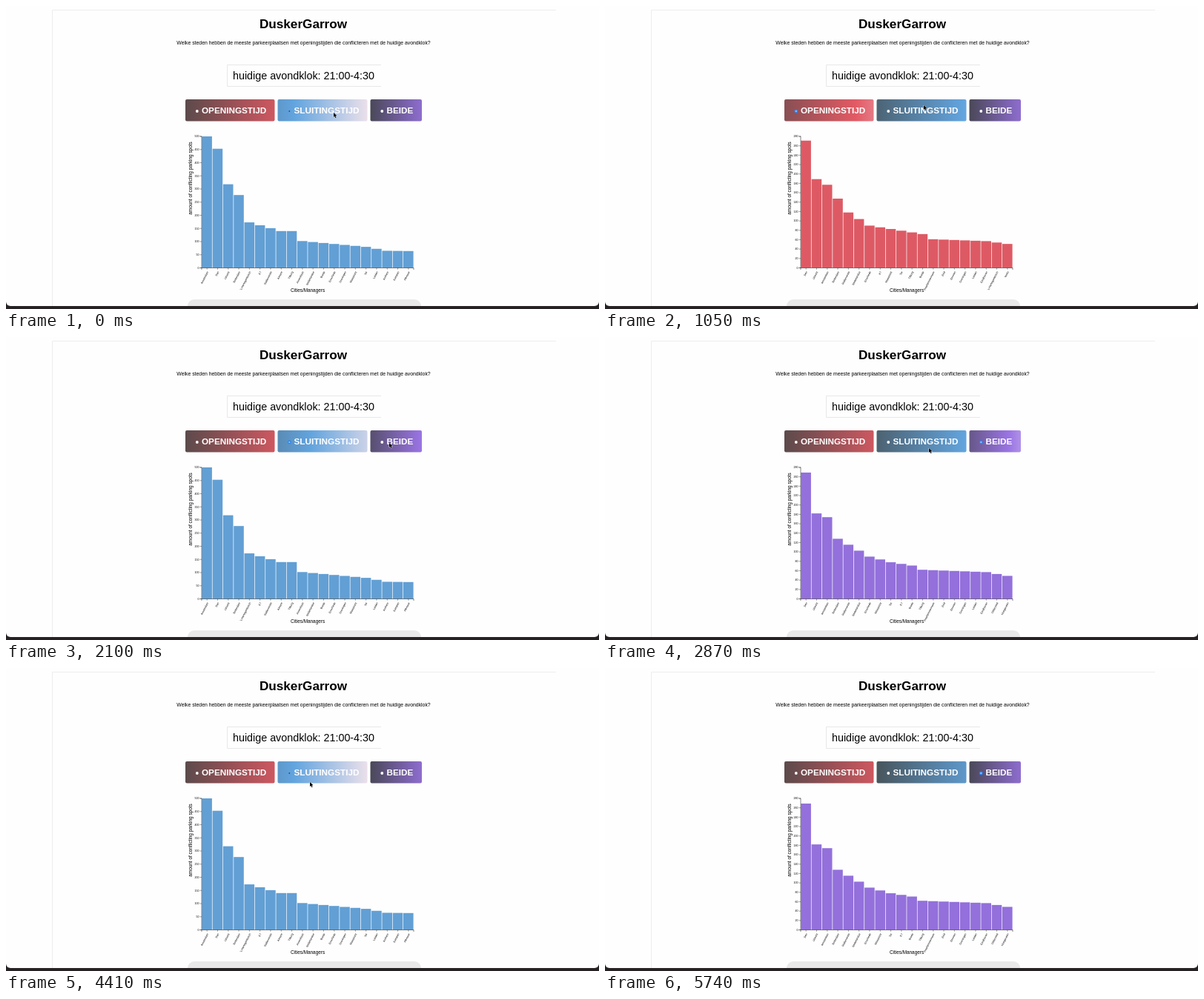
An HTML page with a canvas for the animation above (5810 ms loop, 800 by 409 pixels).

```html
<!DOCTYPE html>
<html lang="nl">
<head>
<meta charset="utf-8">
<title>Avondklok</title>
<style>
html, body { margin: 0; width: 100%; height: 100%; overflow: hidden; background: #fefefe; }
canvas { display: block; width: 800px; height: 409px; }
</style>
</head>
<body>
<canvas id="stage" width="800" height="409"></canvas>
<script>
const ctx = document.getElementById('stage').getContext('2d');
const LOOP = 5810, STEP = 70, FADE = 500;
const FONT = '"Liberation Sans", Arial, sans-serif';

const BARS = 20;
const PLOT = { left: 264, right: 550, top: 176, base: 353.5 };
const ROW = { top: 126, height: 29.5 };

// curve: a few [bar index, value] points, straight in between
const choices = [
  {
    label: 'OPENINGSTIJD', x: 242, w: 120.5, shades: ['#5c4a4b', '#e25a64', '#ecdde8'],
    color: '#dd5a64', max: 280, tick: 20,
    curve: [[0, 271], [1, 189], [2, 177], [4, 118], [6, 90], [11, 72], [12, 61], [17, 57], [19, 51]],
    names: "Den Utrecht Amsterdam Rotterdam Stallenveste Nederlandse Enschede K7 Maastricht Ter Tilburg Breda Haarlemmermeer Zuid Emmen Groningen Leiden Eindhoven 's-Hertogenbosch Venlo"
  },
  {
    label: 'SLUITINGSTIJD', x: 366.5, w: 121, shades: ['#48555c', '#62a4de', '#ebe0ea'],
    color: '#629fd4', max: 500, tick: 50,
    curve: [[0, 500], [1, 453], [2, 318], [3, 277], [4, 173], [7, 140], [8, 140], [9, 102], [15, 80], [17, 65], [19, 64]],
    names: "Amsterdam Den Utrecht Rotterdam 's-Hertogenbosch K7 Stallenveste Almere Tilburg Amersfoort Nederlandse Breda Enschede Groningen Maastricht Ter Leiden Arnhem Kampen Alkmaar"
  },
  {
    label: 'BEIDE', x: 491.5, w: 69.5, shades: ['#4a4858', '#9a74e4', '#e6dcf0'],
    color: '#9370db', max: 280, tick: 20,
    curve: [[0, 269], [1, 182], [2, 174], [3, 128], [6, 90], [8, 78], [10, 71], [11, 62], [17, 57], [19, 49]],
    names: "Den Utrecht Amsterdam Rotterdam Stallenveste Nederlandse Enschede Maastricht Ter K7 Breda Tilburg Haarlemmermeer Zuid Emmen Groningen Leiden Eindhoven Oldenzaal Hoogeveen"
  }
];

// pointer stops: [time, x, y]
const path = [
  [0, 442, 144], [500, 322, 142], [760, 326, 140], [880, 385, 122], [1050, 430, 134],
  [1350, 444, 143], [1800, 446, 144], [2100, 517, 143], [2450, 522, 145], [2700, 472, 158],
  [2870, 437, 150], [3120, 405, 150], [3300, 372, 160], [3480, 345, 150], [3710, 360, 153],
  [3800, 350, 150], [3920, 372, 153], [4410, 410, 154], [4850, 518, 145], [5080, 520, 146],
  [5400, 530, 175], [5740, 550, 420]
];
const clickTimes = [0, 580, 1350, 2350, 3120, 3790, 4380, 5000];

const linear = u => u;
const smooth = u => u * u * (3 - 2 * u);

// Value of one column at position t in a list of [position, ...values]
function sample(keys, t, column, ease) {
  const i = keys.findIndex(k => k[0] >= t);
  if (i < 0) return keys[keys.length - 1][column];
  if (i === 0) return keys[0][column];
  const a = keys[i - 1], b = keys[i];
  return a[column] + (b[column] - a[column]) * ease((t - a[0]) / (b[0] - a[0]));
}

const pointer = t => [1, 2].map(column => sample(path, t, column, smooth));

function isOver(choice, [x, y]) {
  return x >= choice.x && x <= choice.x + choice.w && y >= ROW.top && y <= ROW.top + ROW.height;
}

const clicks = clickTimes.map(time => ({ time, choice: choices.find(c => isOver(c, pointer(time))) }));

// Hover level of a button at each step, following the pointer
function hoverLevels(choice) {
  let level = isOver(choice, pointer(0)) ? 1 : 0;
  return Array.from({ length: LOOP / STEP }, (_, i) => {
    const change = (isOver(choice, pointer(i * STEP)) ? STEP : -STEP) / FADE;
    level = Math.min(1, Math.max(0, level + change));
    return smooth(level);
  });
}
choices.forEach(c => { c.hover = hoverLevels(c); });

function text(str, x, y, size, align = 'left', color = '#000', weight = 'normal') {
  ctx.font = `${weight} ${size}px ${FONT}`;
  ctx.textAlign = align;
  ctx.fillStyle = color;
  ctx.fillText(str, x, y);
}

function turned(str, x, y, size, degrees, align) {
  ctx.save();
  ctx.translate(x, y);
  ctx.rotate(degrees * Math.PI / 180);
  text(str, 0, 0, size, align);
  ctx.restore();
}

function line(color, width, ...points) {
  ctx.strokeStyle = color;
  ctx.lineWidth = width;
  ctx.beginPath();
  points.forEach(([x, y]) => ctx.lineTo(x, y));
  ctx.stroke();
}

function fillRound(x, y, w, h, r, fill) {
  ctx.fillStyle = fill;
  ctx.beginPath();
  ctx.roundRect(x, y, w, h, r);
  ctx.fill();
}

function dot(x, y, r, color) {
  ctx.fillStyle = color;
  ctx.beginPath();
  ctx.arc(x, y, r, 0, Math.PI * 2);
  ctx.fill();
}

function drawPage() {
  ctx.fillStyle = '#262224';
  ctx.fillRect(0, 0, 800, 409);
  fillRound(0, -10, 800, 415, 6, '#fefefe');
  line('#ededed', 1, [62.5, 405], [62.5, 5.5], [742, 5.5]);
  fillRound(245, 396, 315, 9, [9, 9, 0, 0], '#e9e9ea');

  text('DuskerGarrow', 401, 29.6, 17.15, 'center', '#000', 'bold');
  text('Welke steden hebben de meeste parkeerplaatsen met openingstijden die conflicteren met de huidige avondklok?',
    401.5, 52, 6.87, 'center');
  line('#e8e8e8', 1, [506, 79.5], [298.5, 79.5], [298.5, 108.5], [506, 108.5]);
  text('huidige avondklok: 21:00-4:30', 306, 98.5, 14.32);
}

function drawButton(choice, hover, selected, pressed) {
  const { x, w, shades } = choice;
  const start = x - hover * w;
  const fill = ctx.createLinearGradient(start, 0, start + 2 * w, 0);
  [0, .59, 1].forEach((stop, i) => fill.addColorStop(stop, shades[i]));
  fillRound(x, ROW.top, w, ROW.height, 2, fill);

  const cx = x + 15.8, cy = 142;
  if (!selected) {
    dot(cx, cy, 1.9, '#fff');
  } else if (pressed) {
    dot(cx, cy, .9, '#1d4f86');
  } else {
    dot(cx, cy, 2.4, '#2a86f5');
    dot(cx, cy, 1.1, '#a9c9ee');
  }
  text(choice.label, x + 22, 144.7, 11.72, 'left', '#fff', 'bold');
}

function drawChart({ color, max, tick, curve, names }) {
  const { left, right, top, base } = PLOT;
  const pitch = (right - left) / BARS;
  const scale = (base - top) / max;

  names.split(' ').forEach((name, i) => {
    const x = left + i * pitch, mid = x + pitch / 2;
    const height = sample(curve, i, 1, linear) * scale;
    ctx.fillStyle = color;
    ctx.fillRect(x + .3, base - height, pitch - .7, height);
    line('#333', .5, [mid, base], [mid, base + 2.2]);
    turned(name, mid + 2, base + 5.5, 3.6, -63, 'right');
  });

  line('#333', .6, [left - 2.5, top], [left, top], [left, base], [left - 2.5, base]);
  line('#333', .6, [left, base + 2.5], [left, base], [right, base], [right, base + 2.5]);
  for (let v = 0; v <= max; v += tick) {
    const y = base - v * scale;
    line('#333', .5, [left - 2.2, y], [left, y]);
    text(v, left - 3.6, y + 1.3, 3.6, 'right');
  }

  turned('amount of conflicting parking spots', 251.3, 232.5, 6.4, -90, 'center');
  text('Cities/Managers', 407, 385.5, 6.4, 'center');
}

function drawPointer([x, y]) {
  const shape = [[0, 0], [0, 6], [1.4, 4.8], [2.5, 7.2], [3.5, 6.7], [2.5, 4.4], [4.4, 4.2]];
  ctx.beginPath();
  shape.forEach(([dx, dy]) => ctx.lineTo(x + dx, y + dy));
  ctx.closePath();
  ctx.strokeStyle = 'rgba(255,255,255,.8)';
  ctx.lineWidth = 1;
  ctx.stroke();
  ctx.fillStyle = '#000';
  ctx.fill();
}

function draw(now) {
  const step = Math.floor((now % LOOP) / STEP);
  const t = step * STEP;
  const click = clicks.filter(c => c.time <= t).pop();
  drawPage();
  choices.forEach(c => drawButton(c, c.hover[step], c === click.choice, t - click.time < STEP));
  drawChart(click.choice);
  drawPointer(pointer(t));
}

const begin = performance.now();
function tick() {
  draw(performance.now() - begin);
  requestAnimationFrame(tick);
}
tick();
</script>
</body>
</html>
```
